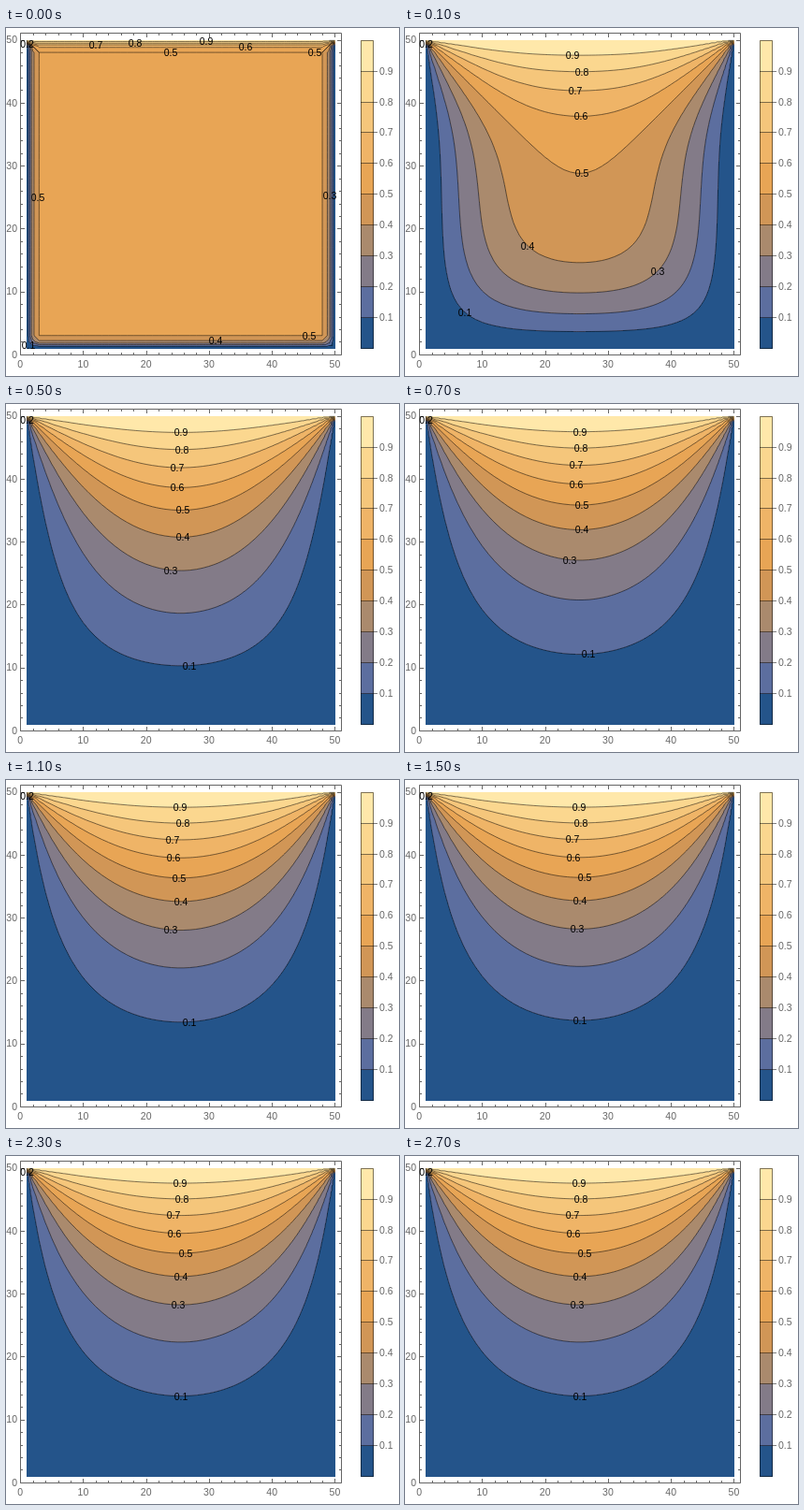
An HTML page with a canvas for the animation above (3900 ms loop, 420 px wide and 372 px high).

```html
<!DOCTYPE html>
<html>
<head>
<meta charset="utf-8">
<title>Relaxation contour plot</title>
<style>
  html, body { margin: 0; width: 420px; height: 372px; overflow: hidden; background: #fff; }
  canvas { display: block; }
</style>
</head>
<body>
<canvas id="plot" width="420" height="372"></canvas>
<script>
const ctx = document.getElementById('plot').getContext('2d');
const N = 50, SCALE = 6.725, X0 = 15.2, Y0 = 348.9;
const LEFT = 22, TOP = 13, SIZE = 330;
const FRAMES = 28, STEP = 100, LOOP = 3900, SWEEPS = 200;
const GRAY = '#666', LINE = 'rgba(0,0,0,0.5)';
const COLORS = ['#24548a', '#5c6e9f', '#837b88', '#aa8a6d', '#d19656',
                '#e8a555', '#efb467', '#f5c67b', '#fbd78f', '#ffe8aa'];
const RGB = COLORS.map(c => [1, 3, 5].map(i => parseInt(c.slice(i, i + 2), 16)));
const px = x => X0 + x * SCALE;
const py = y => Y0 - y * SCALE;

// Label x positions for levels 0.1, 0.3 ... 0.9, each row valid from a frame on
const LABELS = [
  [1, 64, 270, 131, 189, 188, 182, 189, 179],
  [2, 97, 188, 187, 183, 185, 183, 184, 184],
  [5, 196, 176, 189, 189, 183, 183, 188, 187],
  [9, 196, 176, 187, 185, 179, 178, 189, 186],
  [14, 187, 184, 187, 192, 180, 179, 188, 186]
];
const LABEL_LEVELS = [1, 3, 4, 5, 6, 7, 8, 9];
const FIRST_LABELS = [
  [1, 24, 339], [3, 346, 179], [4, 224, 334], [5, 176, 26], [5, 330, 26],
  [5, 34, 181], [5, 324, 329], [6, 256, 20], [7, 96, 18], [8, 138, 16], [9, 214, 14]
];

// Jacobi relaxation: top edge 1, other edges 0, interior starts at 0.5
function relax(u) {
  const v = u.slice();
  for (let j = 1; j < N - 1; j++)
    for (let i = 1; i < N - 1; i++) {
      const k = j * N + i;
      v[k] = (u[k - 1] + u[k + 1] + u[k - N] + u[k + N]) / 4;
    }
  return v;
}

function solve() {
  let u = new Float64Array(N * N);
  for (let j = 0; j < N; j++)
    for (let i = 0; i < N; i++)
      u[j * N + i] = j === N - 1 ? 1 : i && j && i < N - 1 ? 0.5 : 0;
  u = relax(u);
  const states = [u];
  while (states.length < FRAMES) {
    for (let n = 0; n < SWEEPS; n++) u = relax(u);
    states.push(u);
  }
  return states;
}

// Bilinear value at a canvas position
function sample(u, x, y) {
  const clamp = v => Math.min(N - 1.0001, Math.max(0, v));
  const gx = clamp((x - X0) / SCALE - 1), gy = clamp((Y0 - y) / SCALE - 1);
  const i = gx | 0, j = gy | 0, a = gx - i, b = gy - j, k = j * N + i;
  return (u[k] * (1 - a) + u[k + 1] * a) * (1 - b) +
         (u[k + N] * (1 - a) + u[k + N + 1] * a) * b;
}

function drawBands(u) {
  const img = ctx.createImageData(SIZE, SIZE);
  for (let y = 0, p = 0; y < SIZE; y++)
    for (let x = 0; x < SIZE; x++, p += 4) {
      const v = sample(u, LEFT + x + 0.5, TOP + y + 0.5);
      img.data.set(RGB[Math.min(9, Math.floor(v * 10 + 1e-5))], p);
      img.data[p + 3] = 255;
    }
  ctx.putImageData(img, LEFT, TOP);
}

function traceTriangle(u, level, ks) {
  const pts = [];
  for (let n = 0; n < 3; n++) {
    const a = ks[n], b = ks[(n + 1) % 3];
    if ((u[a] < level) === (u[b] < level)) continue;
    const t = (level - u[a]) / (u[b] - u[a]);
    const ax = a % N, ay = a / N | 0;
    pts.push([px(1 + ax + t * (b % N - ax)), py(1 + ay + t * ((b / N | 0) - ay))]);
  }
  if (pts.length === 2) line(...pts[0], ...pts[1]);
}

function traceLevel(u, level) {
  for (let j = 0; j < N - 1; j++)
    for (let i = 0; i < N - 1; i++) {
      const k = j * N + i;
      traceTriangle(u, level, [k, k + 1, k + N]);
      traceTriangle(u, level, [k + 1, k + N, k + N + 1]);
    }
}

function drawContours(u) {
  const middle = u[N * N / 2 + N / 2];
  ctx.strokeStyle = LINE;
  ctx.lineWidth = 1;
  for (let n = 1; n < 10; n++) {
    ctx.beginPath();
    traceLevel(u, n / 10 - 1e-6);
    // a plateau at the level itself also has an upper edge
    if (middle === n / 10) traceLevel(u, n / 10 + 1e-6);
    ctx.stroke();
  }
}

function text(s, x, y, align, color) {
  ctx.font = '10.5px "Liberation Sans", Arial, sans-serif';
  ctx.textAlign = align;
  ctx.fillStyle = color;
  ctx.fillText(s, x, y + 3.8);
}

function drawLabels(u, frame) {
  const label = (n, x, y) => text('0.' + n, x, y, 'center', '#000');
  label(2, 22.5, 17.5);
  if (!frame) return FIRST_LABELS.forEach(l => label(...l));
  const row = LABELS.filter(r => r[0] <= frame).pop();
  LABEL_LEVELS.forEach((n, i) => {
    const x = row[i + 1];
    let y = TOP;
    while (y < TOP + SIZE && sample(u, x, y) > n / 10) y += 0.25;
    label(n, x, y);
  });
}

function line(x1, y1, x2, y2) {
  ctx.moveTo(x1, y1);
  ctx.lineTo(x2, y2);
}

function drawAxes() {
  const l = 15.5, r = 358.5, t = 5.5, b = 349.5;
  ctx.strokeStyle = GRAY;
  ctx.beginPath();
  ctx.rect(l, t, r - l, b - t);
  for (let v = 0; v <= 50; v += 2) {
    const major = v % 10 === 0, len = major ? 4.5 : 2.5;
    const x = Math.round(px(v)) + 0.5, y = Math.round(py(v)) + 0.5;
    line(x, b, x, b - len);
    line(x, t, x, t + len);
    line(l, y, l + len, y);
    line(r, y, r - len, y);
    if (major) {
      text(v, px(v), 359, 'center', GRAY);
      text(v, 12, py(v), 'right', GRAY);
    }
  }
  ctx.stroke();
}

function drawLegend() {
  const x = 379, w = 14, h = 32.87, bottom = 342;
  const edge = n => Math.floor(bottom - n * h);
  COLORS.forEach((c, i) => {
    ctx.fillStyle = c;
    ctx.fillRect(x, edge(i + 1), w, edge(i) - edge(i + 1) + 1);
  });
  ctx.strokeStyle = LINE;
  ctx.beginPath();
  ctx.rect(x + 0.5, edge(10) + 0.5, w - 1, bottom - edge(10));
  for (let n = 1; n < 10; n++) {
    const y = edge(n) + 0.5;
    line(x, y, x + 18, y);
    text('0.' + n, 399, y, 'left', GRAY);
  }
  ctx.stroke();
}

const states = solve();
let shown = -1;

function tick() {
  const frame = Math.min(FRAMES - 1, Math.floor(performance.now() % LOOP / STEP));
  if (frame !== shown) {
    shown = frame;
    const u = states[frame];
    ctx.fillStyle = '#fff';
    ctx.fillRect(0, 0, 420, 372);
    drawBands(u);
    drawContours(u);
    drawAxes();
    drawLegend();
    drawLabels(u, frame);
  }
  requestAnimationFrame(tick);
}
tick();
</script>
</body>
</html>
```
